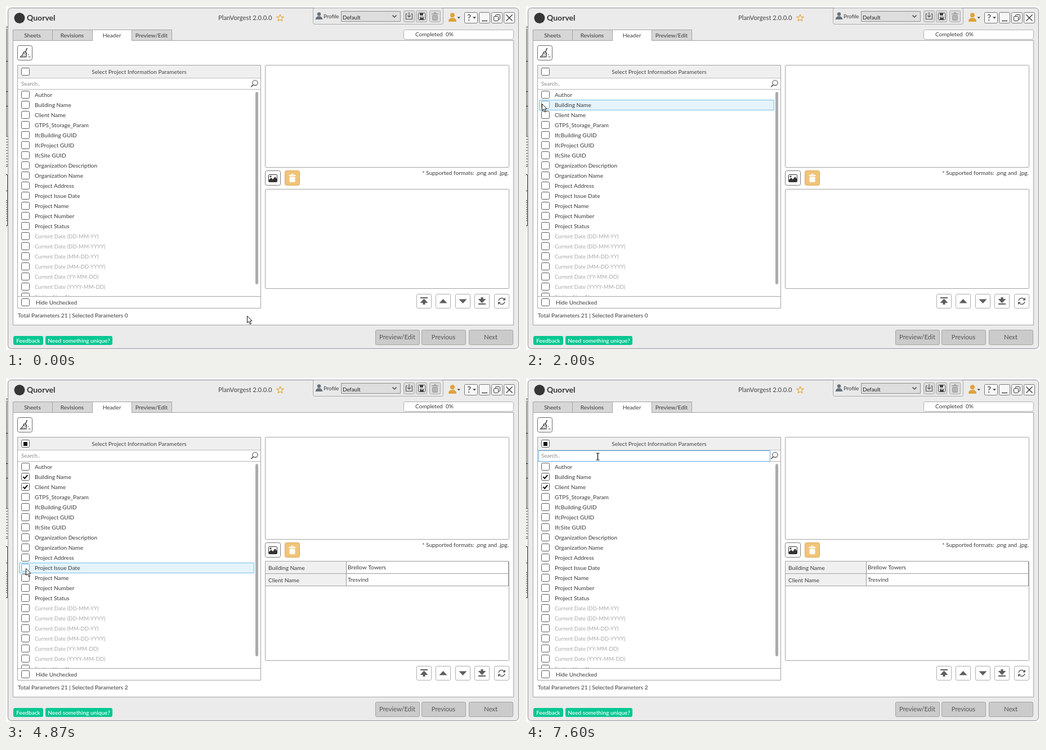
Recreate the animation shown at these times as an HTML page with a canvas. Size 913 by 613 pixels, loop 8 s.

```html
<!DOCTYPE html>
<html lang="en">
<head>
<meta charset="utf-8">
<title>Header parameters</title>
<style>
  html, body { margin: 0; width: 100%; height: 100%; overflow: hidden; background: #f6f6f6; }
  canvas { display: block; }
</style>
</head>
<body>
<canvas id="stage" width="913" height="613"></canvas>
<script>
const ctx = document.getElementById('stage').getContext('2d');
const LOOP = 8000, RATE = 15;
const INK = '#3a3a3a', EDGE = '#a3a3a3', BLUE = '#5aa5dd';

const ROWS = ['Author', 'Building Name', 'Client Name', 'GTPS_Storage_Param', 'IfcBuilding GUID',
  'IfcProject GUID', 'IfcSite GUID', 'Organization Description', 'Organization Name',
  'Project Address', 'Project Issue Date', 'Project Name', 'Project Number', 'Project Status',
  'Current Date (DD-MM-YY)', 'Current Date (DD-MM-YYYY)', 'Current Date (MM-DD-YY)',
  'Current Date (MM-DD-YYYY)', 'Current Date (YY-MM-DD)', 'Current Date (YYYY-MM-DD)',
  'Station User Name'];
const FIRST_DATE = 14;

// Pointer path: step (1/15 s), x, y
const PATH = [
  [0, 428, 552], [1, 427, 554], [4, 412, 565], [8, 330, 545], [10, 270, 510], [12, 205, 460],
  [13, 175, 410], [15, 120, 345], [17, 86, 300], [18, 80, 291], [22, 55, 235], [26, 33, 182],
  [30, 28, 174], [37, 28, 174], [47, 34, 190], [57, 34, 190], [63, 37, 252], [64, 38, 270],
  [69, 36, 309], [72, 36, 332], [73, 35, 339], [77, 36, 348], [86, 36, 348], [88, 55, 310],
  [90, 92, 210], [91, 106, 163], [92, 112, 154], [95, 119, 128], [98, 122, 113], [99, 122, 113],
  [101, 124, 128], [103, 127, 140], [120, 127, 140]
];
// Steps at which each parameter is ticked and then listed
const PICKS = [
  { row: 1, tick: 35, list: 38, value: 'Brellow Towers' },
  { row: 2, tick: 55, list: 58, value: 'Tresvind' }
];
const FOCUS = 106, CARET_OFF = 114;

function pointerAt(step) {
  const i = Math.max(1, PATH.findIndex(p => p[0] >= step));
  const [s0, x0, y0] = PATH[i - 1], [s1, x1, y1] = PATH[i];
  const k = Math.max(0, (step - s0) / (s1 - s0));
  return { x: Math.round(x0 + (x1 - x0) * k), y: Math.round(y0 + (y1 - y0) * k) };
}

function box(x, y, w, h, fill, stroke, r = 0) {
  ctx.beginPath();
  ctx.roundRect(x + 0.5, y + 0.5, w - 1, h - 1, r);
  if (fill) { ctx.fillStyle = fill; ctx.fill(); }
  if (stroke) { ctx.strokeStyle = stroke; ctx.lineWidth = 1; ctx.stroke(); }
}

function rect(x, y, w, h, fill) {
  ctx.fillStyle = fill;
  ctx.fillRect(x, y, w, h);
}

function trace(points) {
  ctx.beginPath();
  for (let i = 0; i < points.length; i += 2) ctx.lineTo(points[i], points[i + 1]);
}

function line(color, width, ...points) {
  trace(points);
  ctx.strokeStyle = color;
  ctx.lineWidth = width;
  ctx.stroke();
}

function poly(color, ...points) {
  trace(points);
  ctx.fillStyle = color;
  ctx.fill();
}

function arc(x, y, r, from = 0, to = Math.PI * 2) {
  ctx.beginPath();
  ctx.arc(x, y, r, from, to);
}

function dot(x, y, r, color) {
  arc(x, y, r);
  ctx.fillStyle = color;
  ctx.fill();
}

function text(str, x, mid, { size = 10.15, color = INK, align = 'left', weight = 400 } = {}) {
  ctx.font = `${weight} ${size}px Lato, "Open Sans", sans-serif`;
  ctx.fillStyle = color;
  ctx.textAlign = align;
  ctx.fillText(str, x, mid + 4);
}

function checkbox(mid, stroke = '#5c5c5c') {
  box(27, mid - 7, 15, 14, '#fff', stroke, 2);
}

function trash(x, y, color) {
  rect(x - 6, y - 5, 12, 2, color);
  rect(x - 2, y - 7, 4, 2, color);
  box(x - 5, y - 2, 10, 10, color, color, 1);
  for (const dx of [-2.5, 0, 2.5]) line('rgba(255,255,255,.55)', 0.8, x + dx, y, x + dx, y + 6);
}

function backdrop() {
  rect(0, 0, 913, 613, '#f6f6f6');
  rect(0, 0, 3, 613, '#fff');
  rect(0, 37, 4, 1, '#222');
  rect(1, 40, 1, 192, '#333');
  for (const y of [98, 152, 178, 285, 300, 329, 391]) rect(0, y, 4, 1, '#222');
  for (let y = 232; y < 284; y += 5) rect(0, y, 3, 1, '#555');
  for (let y = 346; y < 384; y += 4) rect(0, y, 3, 1, '#555');
  rect(2, 300, 1, 92, '#555');
  box(3, 3, 908, 608, '#ebebeb', '#929292', 6);
}

function titleBar() {
  dot(24, 21.5, 9.5, '#363636');
  text('Quorvel', 37, 22, { size: 14, weight: 700, color: '#363636' });
  text('PlanVorgest 2.0.0.0', 377, 21, { size: 11.3, color: '#444' });

  const star = [];
  for (let i = 0; i <= 10; i++) {
    const a = -Math.PI / 2 + i * Math.PI / 5, r = i % 2 ? 3 : 6.3;
    star.push(487 + r * Math.cos(a), 21.5 + r * Math.sin(a));
  }
  line('#e9a93a', 1.2, ...star);

  box(545, 3, 232, 30, '#e9e9e9', '#adadad', 3);
  rect(546, 2, 230, 1, '#f6f6f6');
  dot(556, 14.5, 3.2, '#68727d');
  poly('#68727d', 549.5, 24, 551, 20, 554, 18.3, 558, 18.3, 561, 20, 562.5, 24);
  text('Profile', 564, 18, { size: 9.7 });
  box(595, 9, 106, 19, '#dedede', '#8f8f8f');
  text('Default', 598, 20, { size: 9.7, color: '#222' });
  line('#444', 1.5, 686.5, 16.5, 690, 20, 693.5, 16.5);

  for (const x of [706, 728, 752]) box(x, 8, 20, 21, '#dcdcdc', '#a8a8a8', 2);
  line('#555', 1.2, 713, 14, 710.5, 14, 710.5, 23.5, 721.5, 23.5, 721.5, 14, 719, 14);
  line('#555', 1.2, 716, 11, 716, 20);
  line('#555', 1.2, 713, 17, 716, 20, 719, 17);
  box(732, 12, 13, 13, '#f4f4f4', '#444', 1);
  rect(735, 13, 6, 4, '#444');
  rect(735, 19, 7, 5, '#444');
  rect(736, 20, 5, 1, '#f4f4f4');
  trash(762, 18, '#a6a6a6');

  dot(793, 16.3, 4, '#dfa23c');
  poly('#dfa23c', 786, 28, 786.5, 24, 790, 21.3, 796, 21.3, 799.5, 24, 800, 28);
  poly('#444', 801.5, 19.5, 807, 19.5, 804.2, 22.5);

  for (const [x, w] of [[814, 24], [840, 20], [862, 20], [884, 20]]) box(x, 11, w, 20, '#f7f7f7', '#777', 2);
  text('?', 822.5, 21.5, { size: 16, align: 'center', color: '#333' });
  poly('#333', 829, 19.5, 835, 19.5, 832, 22.5);
  line('#333', 1.3, 845, 26.5, 855, 26.5);
  box(869, 15, 9, 9, null, '#333', 1);
  box(866, 18, 9, 9, '#f7f7f7', '#333', 1);
  line('#333', 1.3, 888.5, 15.5, 899.5, 26.5);
  line('#333', 1.3, 899.5, 15.5, 888.5, 26.5);
}

function tabs() {
  box(12, 61, 890, 508, '#fff', EDGE);
  const names = ['Sheets', 'Revisions', 'Header', 'Preview/Edit'];
  const edges = [12, 82, 153, 223, 294];
  names.forEach((name, i) => {
    const x = edges[i], w = edges[i + 1] - x, active = name === 'Header';
    box(x, 42, w + 1, 20, active ? '#fff' : '#d7d7d7', EDGE);
    if (active) rect(x + 1, 60, w - 1, 3, '#fff');
    text(name, x + w / 2, 52, { align: 'center' });
  });
  box(706, 42, 196, 18, '#fff', '#b0b0b0', 3);
  text('Completed  0%', 727, 50);
}

function broom() {
  box(20, 70, 27, 27, '#fff', '#686868', 3);
  line('#333', 1.5, 37.5, 75, 34.5, 82);
  line('#333', 1.2, 32, 81.5, 36.5, 83.5, 36, 91, 25.5, 91, 29.5, 87, 32, 81.5);
  line('#333', 1, 31, 84.5, 36, 86);
  line('#333', 1, 29, 91, 31, 88);
  line('#333', 1, 32.5, 91, 33.5, 88);
  for (const [x, y] of [[39, 86], [40, 90], [42, 90]]) rect(x, y, 1.3, 1.3, '#333');
}

function parameterList(step) {
  const picked = PICKS.filter(p => step >= p.tick);
  const hover = pointerAt(Math.max(0, step - 1));
  box(20, 105, 433, 434, '#fff', EDGE);
  rect(21, 106, 431, 22, '#efefef');
  rect(21, 128, 431, 1, '#bdbdbd');
  rect(21, 148, 431, 1, '#b5b5b5');
  checkbox(117);
  if (picked.length) rect(31, 114, 7, 7, '#111');
  text('Select Project Information Parameters', 236.5, 117, { align: 'center', color: '#444' });

  const inSearch = hover.y >= 129 && hover.y <= 148;
  if (step >= FOCUS || inSearch) box(22, 129, 412, 20, '#fff', step >= FOCUS ? BLUE : '#86bbe6');
  text('Search..', 27, 138, { color: '#8a8a8a', size: 9.9 });
  if (step >= FOCUS && step < CARET_OFF) rect(28, 133, 1, 12, '#111');
  arc(442.5, 136.8, 4.6);
  ctx.strokeStyle = '#444';
  ctx.lineWidth = 1.1;
  ctx.stroke();
  line('#444', 1.5, 439.2, 140.2, 435.3, 144.3);

  ctx.save();
  ctx.beginPath();
  ctx.rect(21, 149, 431, 368);
  ctx.clip();
  const over = hover.x >= 23 && hover.x < 441 && hover.y >= 149 && hover.y < 517
    ? Math.floor((hover.y - 149) / 18) : -1;
  ROWS.forEach((name, i) => {
    const mid = 158 + i * 18, date = i >= FIRST_DATE;
    if (i === over) box(23, mid - 9, 418, 19, '#e5f3fb', '#78c0e6');
    const lit = i === over && hover.x <= 42 && Math.abs(hover.y - mid) <= 8;
    checkbox(mid, lit ? BLUE : undefined);
    if (picked.some(p => p.row === i)) line('#111', 2, 30.5, mid, 33.3, mid + 3, 38.3, mid - 3.2);
    text(name, 51, mid, date ? { size: 9.6, color: '#a9a9a9' } : {});
  });
  ctx.restore();

  box(443, 153, 5, 343, '#ababab', '#ababab', 2);
  rect(21, 517, 431, 1, EDGE);
  checkbox(528);
  text('Hide Unchecked', 53, 528);
  text(`Total Parameters 21 | Selected Parameters ${PICKS.filter(p => step >= p.list).length}`, 21, 551);
}

function preview(step) {
  box(460, 105, 434, 183, '#fff', EDGE, 1);
  box(460, 326, 434, 178, '#fff', EDGE, 1);
  text('* Supported formats: .png and .jpg.', 893, 297, { align: 'right' });

  box(460, 293, 28, 27, '#fff', '#7b7b7b', 3);
  box(466, 300, 16, 14, '#fff', '#333', 1);
  poly('#333', 467, 313, 467, 310, 471, 306, 474, 309, 478, 304, 481, 308, 481, 313);
  dot(470, 303.7, 1.5, '#333');
  box(495, 293, 27, 27, '#f1c477', '#d8ab5b', 3);
  trash(508.5, 306, '#fff');

  PICKS.filter(p => step >= p.list).forEach((p, i) => {
    const y = 326 + i * 22;
    box(460, y, 145, 23, '#f0f0f0', EDGE);
    box(604, y, 289, 23, '#fff', '#999');
    text(ROWS[p.row], 466, y + 12);
    text(p.value, 607, y + 11);
  });
}

function orderButtons() {
  const color = '#5d5d5d';
  [729, 763, 798, 832, 867].forEach(x => box(x, 513, 27, 26, '#fff', '#adadad', 2));
  rect(736, 519, 13, 2, color);
  poly(color, 735.5, 529, 742.5, 521.5, 749.5, 529);
  rect(740.5, 527, 4, 5, color);
  poly(color, 769.5, 529.5, 776.5, 522, 783.5, 529.5);
  poly(color, 804.5, 522.5, 811.5, 530, 818.5, 522.5);
  rect(843.5, 519, 4, 5, color);
  poly(color, 838.5, 522, 845.5, 529.5, 852.5, 522);
  rect(839, 530, 13, 2, color);

  ctx.strokeStyle = color;
  ctx.lineWidth = 1.5;
  for (const turn of [0, Math.PI]) {
    arc(880.5, 526, 5.5, Math.PI * 1.05 + turn, Math.PI * 1.85 + turn);
    ctx.stroke();
  }
  poly(color, 887, 519.5, 887, 524.5, 882, 524.5);
  poly(color, 874, 532.5, 874, 527.5, 879, 527.5);
}

function footer() {
  const white = { color: '#fff', align: 'center', weight: 500 };
  box(13, 588, 53, 16, '#08c792', '#08c792', 2);
  text('Feedback', 39.5, 596, white);
  box(70, 588, 119, 16, '#08c792', '#08c792', 2);
  text('Need something unique?', 129.5, 596, white);
  [['Preview/Edit', 656], ['Previous', 738], ['Next', 822]].forEach(([name, x]) => {
    box(x, 577, 79, 27, '#cbcbcb', '#a2a2a2', 2);
    text(name, x + 39, 590, { size: 11.3, color: '#555', align: 'center' });
  });
}

function pointer(step) {
  const { x, y } = pointerAt(step);
  if (y >= 129 && y <= 148) {
    line('#111', 1.3, x + 0.5, y - 6, x + 0.5, y + 6);
    for (const dy of [-6, 6]) line('#111', 1, x - 2.5, y + dy, x + 3.5, y + dy);
    return;
  }
  ctx.save();
  ctx.translate(x + 0.5, y + 0.5);
  const arrow = [0, 0, 0, 12, 2.8, 9.6, 5, 14.5, 7, 13.6, 4.9, 8.8, 8.6, 8.6, 0, 0];
  poly('#fff', ...arrow);
  line('#111', 1, ...arrow);
  ctx.restore();
}

function draw(time) {
  const step = Math.floor((time + 5) * RATE / 1000);
  backdrop();
  titleBar();
  tabs();
  broom();
  parameterList(step);
  preview(step);
  orderButtons();
  footer();
  pointer(step);
}

const start = performance.now();
function tick() {
  draw((performance.now() - start) % LOOP);
  requestAnimationFrame(tick);
}
tick();
</script>
</body>
</html>
```
